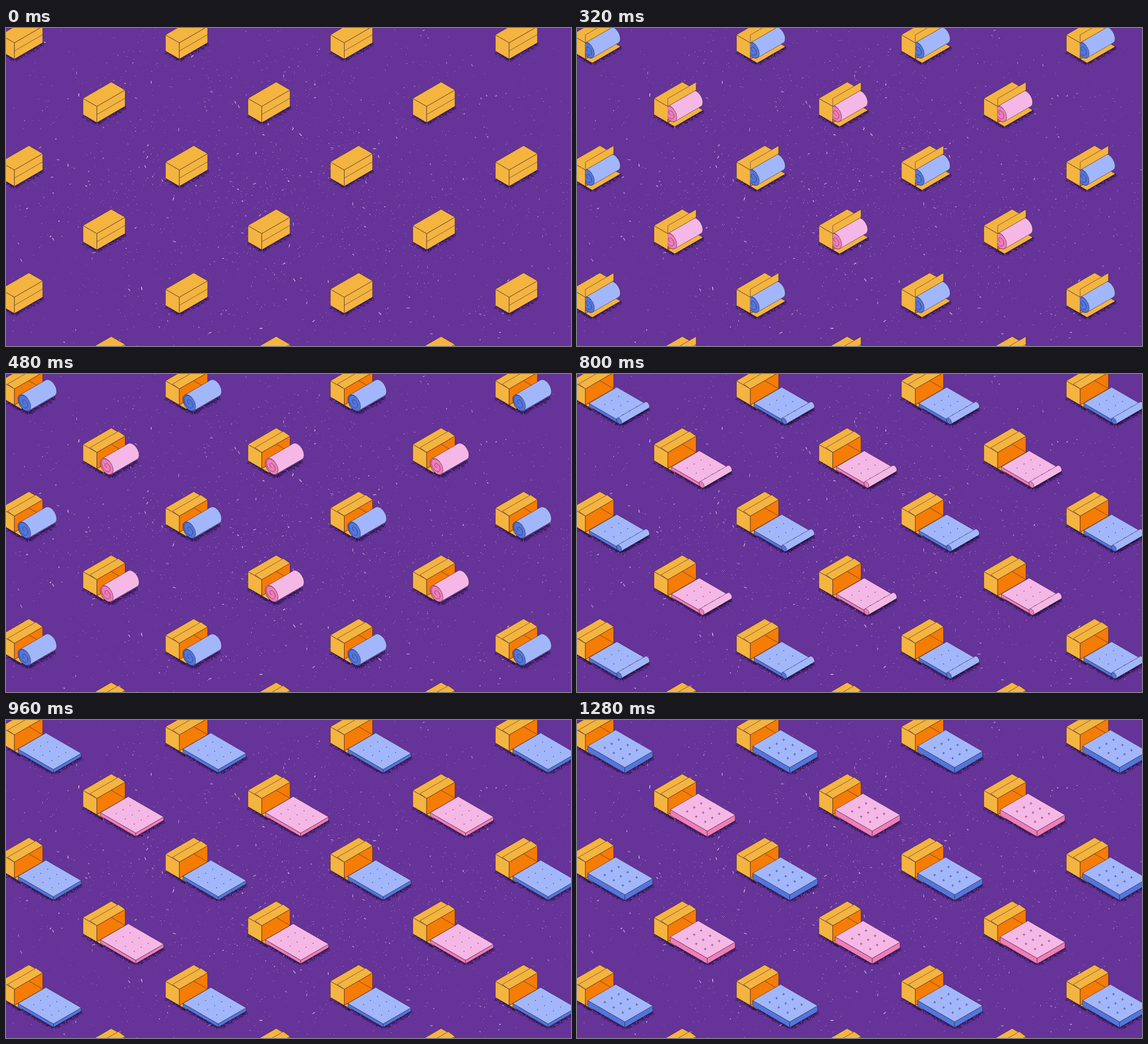
An HTML page with a canvas for the animation above (1.44 s loop, 998x561 px).

```html
<!DOCTYPE html>
<html lang="en">
<head>
<meta charset="utf-8">
<title>Mattress in a box</title>
<style>
  html, body { margin: 0; width: 100%; height: 100%; overflow: hidden; background: #663398; }
  canvas { display: block; }
</style>
</head>
<body>
<canvas id="stage" width="998" height="561"></canvas>
<script>
const ctx = document.getElementById('stage').getContext('2d');
const W = 998, H = 561, STEP = 160;
const INK = '#2b1830', CARD = '#f4b440', INSIDE = '#f57c05';
const PINK = { light: '#f5b8e6', dark: '#f07db8' };
const BLUE = { light: '#a2b7fb', dark: '#5276dc' };

// Box size along depth (a), width (w) and height (z)
const D = 28.3, B = 57.7, T = 28.6, FLAP = 14;
const COS = 0.866;

// roll: [depth, radius, length, lift]; mat: [back, front, thickness]; lid in degrees
const poses = [
  { lid: -90 },
  { lid: 0, roll: [17.5, 13, 53, 4.5] },
  { lid: 90, roll: [32.5, 13, 53, 4.5] },
  { lid: 174, roll: [47.5, 13, 53, 0] },
  { lid: 174, mat: [34.5, 70, 5], roll: [70, 9, 55, 0], mark: 0.8 },
  { lid: 174, mat: [34.5, 96, 5.5], roll: [96, 5, 57, 0], mark: 0.8 },
  { lid: 174, mat: [34.5, 106.5, 6], mark: 0.8 },
  { lid: 174, mat: [34.5, 107.5, 7.5], mark: 1 },
  { lid: 174, mat: [32, 107.5, 10], mark: 2.3 }
];

function randomFrom(seed) {
  return () => (seed = seed * 16807 % 2147483647) / 2147483647;
}

const project = (a, w, z) => [COS * (a + w), 57 + (a - w) / 2 - z];

function trace(points) {
  ctx.beginPath();
  points.forEach(p => ctx.lineTo(...project(...p)));
}

function face(color, ...points) {
  trace(points);
  ctx.closePath();
  ctx.fillStyle = color;
  ctx.fill();
  ctx.stroke();
}

function line(...points) {
  trace(points);
  ctx.stroke();
}

// Grainy shadow along the two near edges of a footprint
function shadow(a0, a1, w0, w1) {
  const rnd = randomFrom(4711);
  const edge = a1 - a0 + w1 - w0;
  ctx.fillStyle = '#21103f';
  for (let i = 0; i < edge * 4; i++) {
    const s = rnd() * edge, left = s < a1 - a0;
    const [x, y] = left ? project(a0 + s, w0, 0) : project(a1, w0 + s - a1 + a0, 0);
    const d = rnd() * rnd() * 8;
    ctx.fillRect(x + (left ? -0.3 : 0.45) * d + rnd() - 0.5, y + d * 0.8 - 1, 1, 1);
  }
}

function drawBox(lid) {
  const open = lid > -90;
  face(CARD, [0, 0, 0], [D, 0, 0], [D, 0, T], [0, 0, T]);
  face(CARD, [0, 0, T], [D, 0, T], [D, B, T], [0, B, T]);
  face(open ? INSIDE : CARD, [D, 0, 0], [D, B, 0], [D, B, T], [D, 0, T]);
  if (open) {
    line([0, B, 0], [D, B, 0]);
    face(CARD, [D, 0, 0], [D + FLAP, 0, 0], [D + FLAP, B, 0], [D, B, 0]);
  } else {
    line([D, 0, T / 2], [D, B, T / 2]);
  }
}

function drawLid(lid) {
  const t = lid * Math.PI / 180;
  const a = D + FLAP * Math.cos(t), z = T + FLAP * Math.sin(t);
  face(CARD, [D, 0, T], [D, B, T], [a, B, z], [a, 0, z]);
}

function drawMattress([a0, a1, h], limit, mark, tone) {
  const w0 = 1.2, w1 = 58;
  face(tone.dark, [a0, w0, 0], [a1, w0, 0], [a1, w0, h], [a0, w0, h]);
  face(tone.dark, [a1, w0, 0], [a1, w1, 0], [a1, w1, h], [a1, w0, h]);
  face(tone.light, [a0, w0, h], [a1, w0, h], [a1, w1, h], [a0, w1, h]);
  for (let i = 1; i < 4; i++) for (let j = 1; j < 4; j++) {
    const a = 34 + 73.5 * i / 4;
    if (a > limit) continue;
    const [x, y] = project(a, w0 + (w1 - w0) * j / 4, h);
    ctx.beginPath();
    ctx.moveTo(x - mark, y);
    ctx.lineTo(x + mark, y);
    ctx.moveTo(x, y - mark);
    ctx.lineTo(x, y + mark);
    ctx.stroke();
  }
}

function drawRoll([a, r, len, lift], tone) {
  const [cx, cy] = project(a, 1, r + lift), q = Math.PI / 4;
  // Paths are built on the sheared end plane, then stroked unsheared
  const onEnd = (build, fill) => {
    ctx.save();
    ctx.transform(COS, 0.5, 0, 1, cx, cy);
    ctx.beginPath();
    build();
    ctx.restore();
    if (fill) {
      ctx.fillStyle = fill;
      ctx.fill();
    }
    ctx.stroke();
  };
  ctx.save();
  if (a < 40) {
    // Hide whatever is still behind the box walls
    trace([[D, 0, -60], [D, 0, T], [D, B, T], [D + 60, B, T], [D + 60, B, -60]]);
    ctx.clip();
  }
  onEnd(() => {
    ctx.arc(0, 0, r, q, 5 * q);
    ctx.arc(len, -len, r, 5 * q, 9 * q);
    ctx.closePath();
  }, tone.light);
  onEnd(() => ctx.arc(0, 0, r, 0, 8 * q), tone.dark);
  if (r > 6) onEnd(() => {
    const turns = r / 7;
    for (let s = 0.1; s <= 1; s += 0.01) {
      const t = s * turns * 8 * q;
      ctx.lineTo(r * s * Math.cos(t), r * s * Math.sin(t));
    }
  });
  ctx.restore();
}

function drawItem(x, y, { lid, roll, mat, mark }, tone) {
  ctx.save();
  ctx.translate(x, y);
  ctx.strokeStyle = INK;
  ctx.lineWidth = 0.55;
  ctx.lineJoin = 'round';
  shadow(0, lid > -90 ? D + FLAP : D, 0, B);
  if (mat) shadow(mat[0], mat[1], 1, 58);
  if (roll && roll[0] > 40) shadow(roll[0] - roll[1], roll[0] + roll[1] * 0.6, 1, roll[2] + 2);
  drawBox(lid);
  if (mat) drawMattress(mat, roll ? roll[0] - roll[1] : 999, mark, tone);
  if (roll) drawRoll(roll, tone);
  if (lid > -90) drawLid(lid);
  ctx.restore();
}

function drawGround() {
  const rnd = randomFrom(2024);
  ctx.fillStyle = '#663398';
  ctx.fillRect(0, 0, W, H);
  ctx.fillStyle = ctx.strokeStyle = '#ecd8f6';
  // Specks gather a little towards the middle
  const spot = size => rnd() < 0.5 ? rnd() * size : (rnd() + rnd()) / 2 * size;
  for (let i = 0; i < 3000; i++) {
    ctx.globalAlpha = 0.15 + 0.6 * rnd() ** 2;
    ctx.fillRect(Math.floor(spot(W)), Math.floor(spot(H)), 1, 1);
  }
  ctx.lineWidth = 1.2;
  for (let i = 0; i < 380; i++) {
    const x = spot(W), y = spot(H), t = rnd() * 6.3, len = 1 + 5 * rnd() ** 3;
    ctx.globalAlpha = 0.5 + 0.5 * rnd();
    ctx.beginPath();
    ctx.moveTo(x, y);
    ctx.lineTo(x + len * Math.cos(t), y + len * Math.sin(t));
    ctx.stroke();
  }
  ctx.globalAlpha = 1;
}

function draw(pose) {
  drawGround();
  for (let row = 0; row < 6; row++) {
    const odd = row % 2;
    for (let col = 0; col < 4; col++) {
      drawItem((odd ? 136 : -9.6) + col * 291.3, -16.4 + row * 112.2, pose, odd ? PINK : BLUE);
    }
  }
}

let shown = -1;
function tick() {
  const i = Math.floor(performance.now() / STEP) % poses.length;
  if (i !== shown) draw(poses[shown = i]);
  requestAnimationFrame(tick);
}
tick();
</script>
</body>
</html>
```
